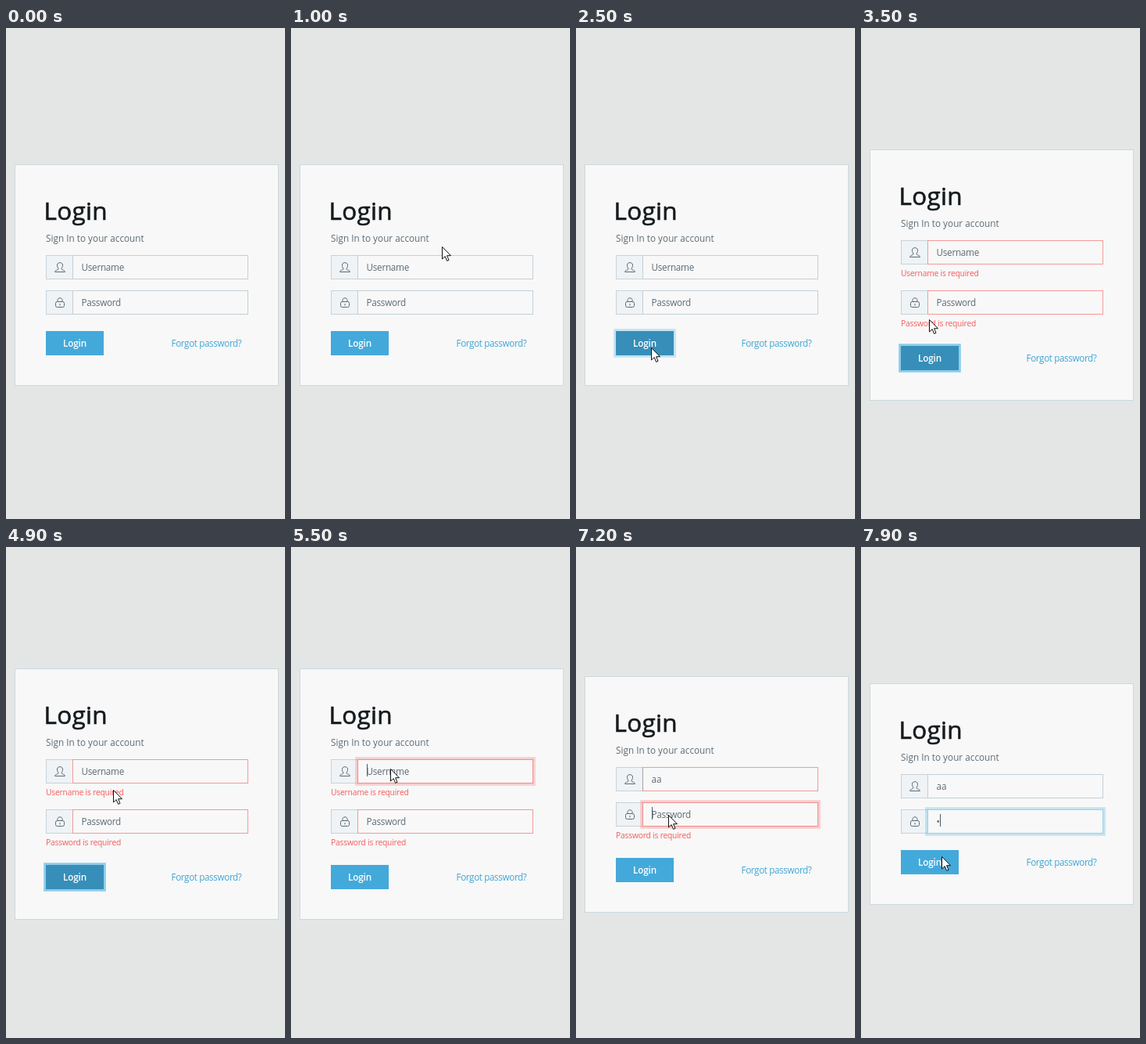
An HTML page that plays this animation: 357x627 px, repeating every 8000 ms.

```html
<!DOCTYPE html>
<html lang="en">
<head>
<meta charset="utf-8">
<title>Login form</title>
<style>
  html, body { margin: 0; width: 100%; height: 100%; overflow: hidden; }
  #stage {
    --ring: 1;
    position: relative; width: 357px; height: 627px; overflow: hidden;
    background: #e4e6e6; color: #5c6b76;
    font: 11.7px/31px "Open Sans", "Noto Sans", sans-serif;
  }
  #stage.half { --ring: .5; }

  .card {
    position: absolute; left: 11px; top: 174px; width: 338px;
    box-sizing: border-box; padding: 116px 39px 39px 40px;
    background: #f8f8f8; box-shadow: inset 0 0 0 1px #cbd9df;
  }
  .one .card { top: 165px; }
  .two .card { top: 155px; }
  h1 {
    position: absolute; left: 37.5px; top: 39px; margin: 0;
    font-size: 31.5px; font-weight: 400; line-height: 40px; letter-spacing: .3px;
    color: #151b1e; -webkit-text-stroke: .6px #151b1e;
  }
  .lead { position: absolute; left: 40px; top: 84px; margin: 0; line-height: 20px; letter-spacing: .04px; }

  .row { display: flex; height: 31px; }
  .icon {
    box-sizing: border-box; width: 34px; height: 31px;
    border: 1px solid #c6d3da; border-right: 0; background: #eff3f5;
  }
  .icon svg { display: block; margin: 8px 0 0 10px; fill: none; stroke: #5c6b76; }
  .field {
    position: relative; box-sizing: border-box; width: 225px; height: 31px;
    padding-left: 10.5px; border: 1px solid #c2d0d8; line-height: 29px;
    letter-spacing: -.25px; white-space: nowrap;
  }
  .value { letter-spacing: 0; }
  .caret { position: relative; visibility: hidden; }
  .caret::after { content: ""; position: absolute; left: 0; top: -1px; width: 1px; height: 16px; background: #4d5a64; }
  .value:not(:empty) ~ .hint { display: none; }
  .error {
    display: none; height: 19px; line-height: 22px;
    font-size: 10.3px; letter-spacing: -.21px; color: #f45b5b;
  }
  .row + .error + .row { margin-top: 14px; }

  .u-bad .user, .p-bad .pass { border-color: #f59a99; }
  .one .field { border-left-color: #a79ea6; }
  .u-msg .u-error, .p-msg .p-error { display: block; }
  .u-focus .user .caret, .p-focus .pass .caret { visibility: visible; }
  .u-focus .user, .p-focus .pass {
    border-color: #9fd0e6;
    box-shadow: 0 0 0 2.8px rgba(32, 168, 216, calc(.25 * var(--ring)));
  }
  .u-focus.u-bad .user, .p-focus.p-bad .pass {
    border-color: #ee8f8f;
    box-shadow: 0 0 0 2.8px rgba(248, 108, 107, calc(.3 * var(--ring)));
  }

  .foot { position: relative; height: 31px; margin-top: 21px; }
  .button {
    width: 74px; height: 31px; text-align: center;
    background: #43a9da; color: #fff; font-weight: 600; letter-spacing: -.1px;
  }
  .press .button {
    background: #378eb9;
    box-shadow: 0 0 0 2.8px rgba(55, 170, 222, calc(.55 * var(--ring)));
  }
  .forgot { position: absolute; left: 160.5px; top: 0; color: #41a6d6; letter-spacing: -.38px; white-space: nowrap; }

  .list {
    display: none; position: absolute; left: 97px; top: 354px; width: 257px; height: 26px;
    box-sizing: border-box; padding-left: 8px; border: 1px solid #111;
    background: #f9f9f9; color: #111; font-weight: 700; line-height: 25px;
  }
  .open .list { display: block; }
  #arrow { position: absolute; left: 0; top: 0; }
</style>
</head>
<body>
<div id="stage">
  <div class="card">
    <h1>Login</h1>
    <p class="lead">Sign In to your account</p>
    <div class="row">
      <div class="icon"><svg width="14" height="14">
        <path d="M5 8.2C3.5 6.5 3.3 4.5 3.6 3C4.2-.1 9.8-.1 10.4 3C10.7 4.5 10.5 6.5 9 8.2C8.8 9.5 10 9.8 11.5 10.3C13 10.9 13.4 11.5 13.4 12.5H.6C.6 11.5 1 10.9 2.5 10.3C4 9.8 5.2 9.5 5 8.2Z"/>
      </svg></div>
      <div class="field user"><span class="value"></span><i class="caret"></i><span class="hint">Username</span></div>
    </div>
    <div class="error u-error">Username is required</div>
    <div class="row">
      <div class="icon"><svg width="14" height="14">
        <path d="M3.5 5.5H10.5Q12.5 5.5 12.5 7.5V10.5Q12.5 12.5 10.5 12.5H3.5Q1.5 12.5 1.5 10.5V7.5Q1.5 5.5 3.5 5.5ZM4 5.5V3.5C4-.1 10-.1 10 3.5V5.5M7 8V10.5"/>
      </svg></div>
      <div class="field pass"><span class="value"></span><i class="caret"></i><span class="hint">Password</span></div>
    </div>
    <div class="error p-error">Password is required</div>
    <div class="foot">
      <div class="button">Login</div>
      <span class="forgot">Forgot password?</span>
    </div>
  </div>
  <div class="list">a</div>
  <svg id="arrow" width="13" height="20">
    <path d="M.5 .5V16L4.2 12.6L6.6 18.4L9 17.4L6.6 11.7H11.5Z" fill="#fff" stroke="#111"/>
  </svg>
</div>
<script>
  const LOOP = 8000, TICK = 100;
  const stage = document.getElementById('stage');
  const arrow = document.getElementById('arrow');
  const userText = stage.querySelector('.user .value');
  const passText = stage.querySelector('.pass .value');

  // start time, classes, username, password
  const states = [
    [0, ''],
    [2500, 'press half'],
    [2600, 'press two u-bad p-bad u-msg p-msg'],
    [5400, 'two u-bad p-bad u-msg p-msg u-focus half'],
    [5500, 'two u-bad p-bad u-msg p-msg u-focus'],
    [5900, 'one u-bad p-bad p-msg u-focus open', 'a'],
    [6300, 'one u-bad p-bad p-msg u-focus', 'aa'],
    [7100, 'one u-bad p-bad p-msg p-focus half', 'aa'],
    [7200, 'one u-bad p-bad p-msg p-focus', 'aa'],
    [7500, 'p-focus half', 'aa', '•'],
    [7600, 'p-focus', 'aa', '•']
  ];

  // time, x, y of the pointer tip
  const path = [
    [500, 350, 85], [1300, 99, 395], [1500, 97, 396], [1700, 97, 396],
    [1900, 96, 408], [3400, 96, 408], [3500, 87, 372], [3700, 69, 316],
    [3800, 69, 316], [4200, 141, 318], [4800, 141, 318], [4900, 137, 310],
    [5100, 127, 283], [6500, 127, 283], [6700, 110, 328], [6800, 118, 342],
    [7700, 118, 342], [7900, 103, 395], [8000, 103, 395]
  ];

  function pointAt(t) {
    const i = path.findIndex(p => p[0] > t);
    const [t0, x0, y0] = path[i - 1], [t1, x1, y1] = path[i];
    const k = (t - t0) / (t1 - t0);
    return [x0 + (x1 - x0) * k, y0 + (y1 - y0) * k].map(Math.round);
  }

  let shown = -1;
  function draw(now) {
    const t = Math.floor(now % LOOP / TICK) * TICK;
    if (t !== shown) {
      shown = t;
      const [, cls, user = '', pass = ''] = states.filter(s => s[0] <= t).pop();
      stage.className = cls;
      userText.textContent = user;
      passText.textContent = pass;
      const visible = t >= path[0][0];
      arrow.style.display = visible ? '' : 'none';
      if (visible) {
        const [x, y] = pointAt(t);
        arrow.style.transform = `translate(${x}px, ${y}px)`;
      }
    }
  }

  const start = performance.now();
  function frame() {
    draw(performance.now() - start);
    requestAnimationFrame(frame);
  }
  frame();
</script>
</body>
</html>
```
